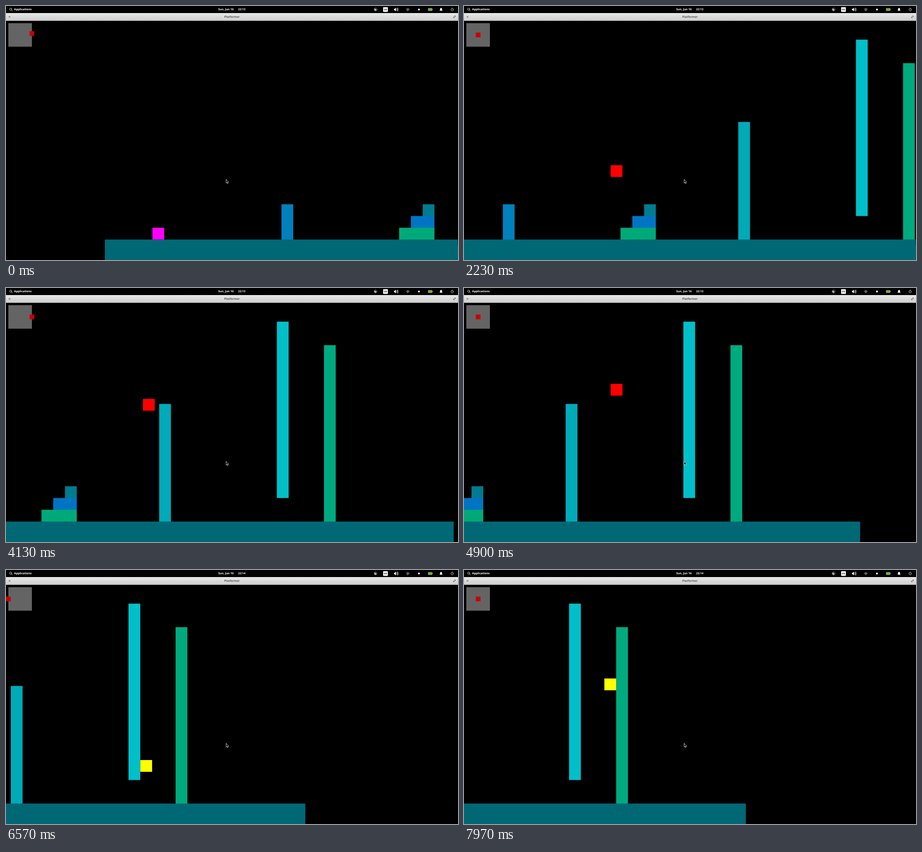
An HTML page for the animation above (8 s loop, 960x540 px).

```html
<!DOCTYPE html>
<html lang="en">
<head>
<meta charset="utf-8">
<title>Platformer</title>
<style>
  html, body { margin: 0; width: 100%; height: 100%; overflow: hidden; background: #000; }
  svg { display: block; width: 960px; height: 540px; }
  text { font: bold 6px "Open Sans", sans-serif; fill: #fff; text-rendering: geometricPrecision; }
  .line { fill: none; stroke: #fff; stroke-width: .8; stroke-linecap: round; }
  .solid { fill: #fff; }
</style>
</head>
<body>
<svg viewBox="0 0 960 540">
  <defs>
    <linearGradient id="bar" x2="0" y2="1">
      <stop stop-color="#e8e8e8"/><stop offset="1" stop-color="#cdcdcd"/>
    </linearGradient>
    <clipPath id="window"><rect width="959.5" height="540"/></clipPath>
  </defs>
  <rect width="960" height="540"/>

  <g transform="translate(0 .5)" clip-path="url(#window)">
    <!-- each block reaches a little under the one below, so no seam shows -->
    <g id="world">
      <rect x="885" y="421" width="25" height="26" fill="#007b90"/>
      <rect x="860" y="446" width="50" height="26" fill="#0074c4"/>
      <rect x="835" y="471" width="75" height="26" fill="#00aa78"/>
      <rect x="585" y="421" width="25" height="76" fill="#0080bc"/>
      <rect x="1085" y="246" width="25" height="251" fill="#00aab8"/>
      <rect x="1335" y="71" width="25" height="375" fill="#00bfc9"/>
      <rect x="1435" y="121" width="25" height="376" fill="#00aa7f"/>
      <rect x="210" y="496" width="1500.5" height="60" fill="#006875"/>
      <rect id="player" width="25" height="25"/>
    </g>
    <rect x="5" y="36" width="50" height="50" fill="#646464"/>
    <rect id="knob" x="25" y="56" width="10" height="10" fill="#c80000"/>
  </g>

  <!-- desktop panel -->
  <rect width="960" height="15"/>
  <circle class="line" cx="9.9" cy="6.8" r="2.3"/>
  <path class="line" d="M11.7 8.6l2 2"/>
  <text x="17.3" y="9.3">Applications</text>
  <text x="450.7" y="9.3">Sun, Jun 16</text>
  <text id="clock" x="493" y="9.3"></text>

  <circle class="line" cx="784.8" cy="7.4" r="3" stroke-dasharray=".8 1.1"/>
  <path class="solid" d="M784.8 5.4a2 2 0 1 0 2 2.3a1.7 1.7 0 0 1-2-2.3"/>
  <rect class="solid" x="801" y="2.5" width="10" height="10" rx="1"/>
  <text x="806" y="9.3" text-anchor="middle" style="fill:#333">us</text>
  <path class="solid" d="M824 6h1.6l2.4-2.4v7.800L825.600 9H824z"/>
  <path class="line" d="M829.200 5.800q1 1.700 0 3.400M830.700 4.700q1.700 2.800 0 5.600M832.100 3.800q2 3.700 0 7.400"/>
  <path class="line" d="M850.200 6.700q3.200-2.700 6.400 0M851.500 8.300q1.900-1.600 3.800 0"/>
  <circle class="solid" cx="853.400" cy="9.900" r=".8"/>
  <circle class="solid" cx="877" cy="7.500" r="2"/>
  <rect x="896.800" y="5" width="8" height="5" rx=".5" fill="#6cab2c" stroke="#b6d68f" stroke-width=".7"/>
  <rect x="905.200" y="6.500" width="1" height="2" fill="#b6d68f"/>
  <path class="solid" d="M920.700 9.800q1.200-1 1.200-3q0-2.500 2.100-2.800q2.100.3 2.100 2.800q0 2 1.200 3zM923 10.300h2q-1 1.400-2 0"/>
  <path class="line" d="M946.200 5.300a2.700 2.700 0 1 0 3 0M947.700 4v3"/>

  <!-- title bar -->
  <rect y="15" width="960" height="16.500" fill="url(#bar)"/>
  <path d="M5.900 21.400l3.200 3.200m0-3.200l-3.200 3.200" stroke="#444" stroke-width=".9"/>
  <text x="479.800" y="25.100" text-anchor="middle" style="fill:#555">Platformer</text>
  <path d="M950.500 25l4-4m-2.200 0h2.200v2.200M950.500 22.800V25h2.200" fill="none" stroke="#444" stroke-width=".8"/>

  <path d="M467.500 368.500v8l1.800-1.600l1.200 2.800l1.300-.6l-1.200-2.700h2.200z" fill="#000" stroke="#fff" stroke-width=".7"/>
</svg>

<script>
const LOOP = 8000, FPS = 30, FRAMES = LOOP * FPS / 1000;
const GRAVITY = 1500, GROUND = 471, STAIR = 396;
const PLAYER_LEFT = 298, FOLLOW = .55;
const PILLAR = 1060, SHAFT_LEFT = 1360, SHAFT_RIGHT = 1410;

// Turning points of the run: seconds, x, y (on the ground if left out).
const path = [
  [0, 311], [.8, 498.5], [1.69, 698], [1.8, 718],
  [2.5, 873, STAIR], [2.65, 906, STAIR], [2.966, 980],
  [3.333, PILLAR, 334], [3.7, PILLAR, 385], [3.85, 1038, 305], [4, PILLAR, 257],
  [4.08, PILLAR, 268], [4.133, 1050.5, 235.5], [4.36, PILLAR, 134.5],
  [5, 1203, 264], [5.24, 1216], [6.1, SHAFT_RIGHT], [6.33, SHAFT_RIGHT],
  [6.567, SHAFT_LEFT, 403.5], [6.6, SHAFT_LEFT, 404],
  [6.85, SHAFT_RIGHT, 288], [7.2, SHAFT_RIGHT, 350],
  [7.45, SHAFT_LEFT, 270], [7.53, SHAFT_LEFT, 280],
  [7.78, SHAFT_RIGHT, 217], [8, SHAFT_RIGHT, 238]
];

const $ = id => document.getElementById(id);
const lerp = (a, b, u) => a + (b - a) * u;
const near = (a, b) => Math.abs(a - b) < 1;

// Between turning points the player runs level or flies a ballistic arc.
function playerAt(t) {
  const next = path.findIndex(point => point[0] > t);
  const [t0, x0, y0 = GROUND] = path[next - 1];
  const [t1, x1, y1 = GROUND] = path[next];
  const walking = y0 === y1;
  const lift = walking ? 0 : GRAVITY / 2 * (t - t0) * (t1 - t);
  const u = (t - t0) / (t1 - t0);
  const x = lerp(x0, x1, u), y = lerp(y0, y1, u) - lift;

  const onWall = near(x, SHAFT_LEFT) || near(x, SHAFT_RIGHT) || (near(x, PILLAR) && y > 221);
  const fill = walking ? "#f0f" : onWall ? "#ff0" : "#f00";
  // The stick points along the motion and is let go in long jumps.
  const longJump = !walking && t1 - t0 > .6;
  const steer = longJump ? 0 : Math.sign(x1 - x0);
  return { x, y, fill, steer };
}

// The view trails the player by a fixed share of the gap per frame.
const views = [0];
for (let i = 1; i < FRAMES; i++) {
  const goal = playerAt((i - 1) / FPS).x - PLAYER_LEFT;
  views[i] = lerp(views[i - 1], goal, FOLLOW);
}

const move = (id, x, y) => $(id).setAttribute("transform", `translate(${x} ${y})`);

function draw(now) {
  const frame = Math.min(FRAMES - 1, Math.floor((now % LOOP + 4) * FPS / 1000));
  const t = frame / FPS;
  const player = playerAt(t);
  move("world", -views[frame], 0);
  move("player", player.x, player.y);
  $("player").setAttribute("fill", player.fill);
  move("knob", 25 * player.steer, -3 * Math.exp(-t) * Math.abs(player.steer));
  $("clock").textContent = t < 5.3 ? "22:13" : "22:14";
}

const start = performance.now();
function tick() {
  draw(performance.now() - start);
  requestAnimationFrame(tick);
}
tick();
</script>
</body>
</html>
```
